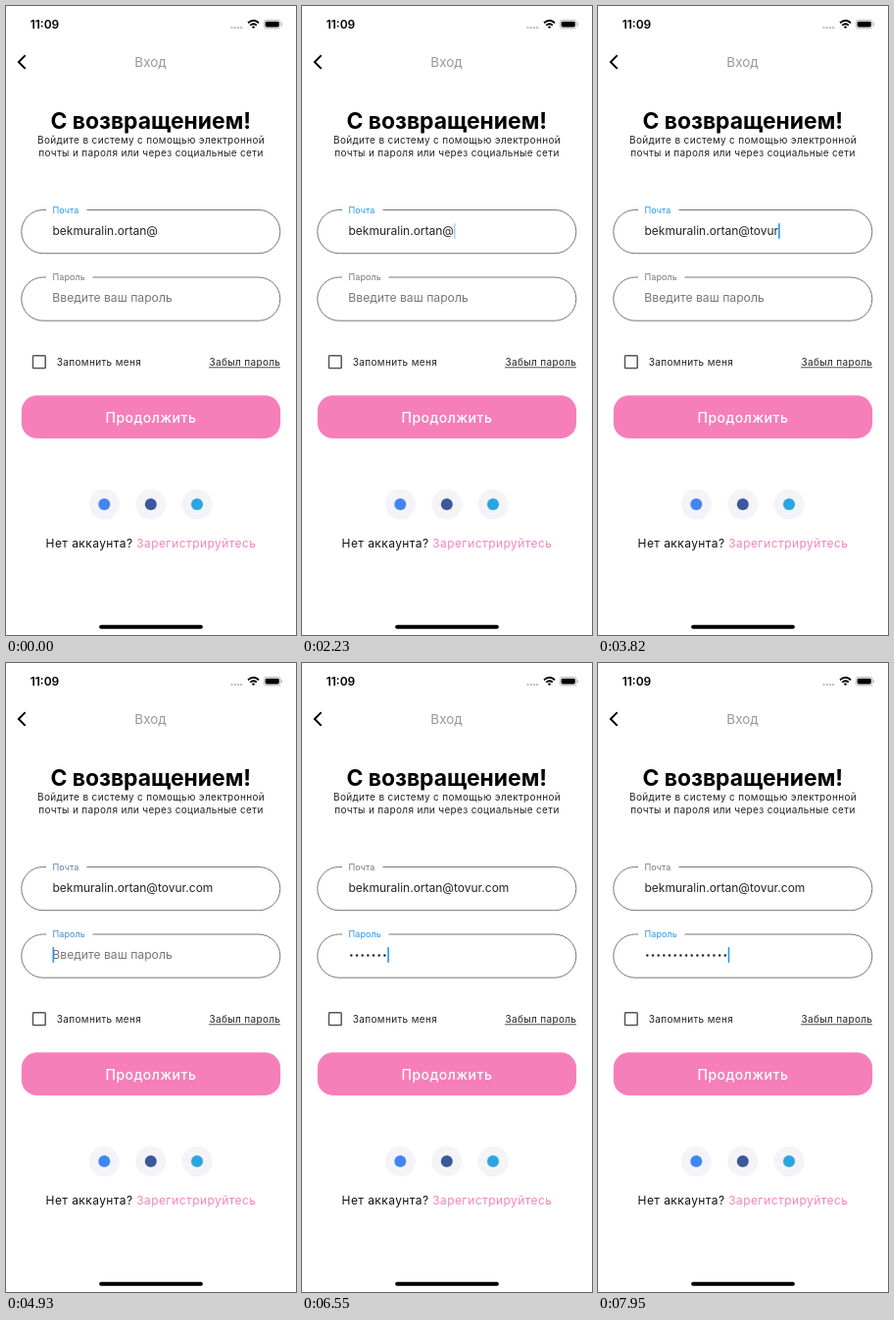
Animation, 296 px wide and 640 px high, one loop 8000 ms. Source, as an HTML page:

```html
<!DOCTYPE html>
<html lang="ru">
<head>
<meta charset="utf-8">
<title>Вход</title>
<style>
  html, body { margin: 0; width: 100%; height: 100%; overflow: hidden; background: #fff; }
  svg { display: block; width: 100%; height: 100%; font-family: Inter, "Open Sans", sans-serif; }
  .mid { text-anchor: middle; }
  .end { text-anchor: end; }
  .small { font-size: 10px; letter-spacing: .35px; fill: #222; }
  .label { font-size: 9px; letter-spacing: .1px; }
  .input { font-size: 12px; fill: #222; }
  .hint { font-size: 12.2px; fill: #777; }
  .footer { font-size: 12px; letter-spacing: .42px; }
  .frame { fill: none; stroke: #777; }
</style>
</head>
<body>
<svg viewBox="0 0 296 640">
  <!-- status bar -->
  <text x="24.7" y="23" font-size="12" font-weight="600">11:09</text>
  <path d="M229.5 22H241.5" stroke="#bbb" stroke-width="2" stroke-dasharray="2 1.2"/>
  <g fill="none" stroke="#000" stroke-width="1.8">
    <path d="M247 17.2Q252.5 12.4 258 17.2"/>
    <path d="M249.2 19.6Q252.5 16.8 255.8 19.6"/>
  </g>
  <path d="M250.8 21.2Q252.5 19.8 254.2 21.2L252.5 23Z"/>
  <rect x="263.3" y="14.4" width="16.8" height="8.4" rx="2.4" fill="none" stroke="#aaa" stroke-width=".8"/>
  <rect x="264.6" y="15.7" width="14.2" height="5.8" rx="1.4"/>
  <path d="M281.3 17.2V20" stroke="#aaa"/>

  <!-- heading -->
  <path d="M19.7 50.2L12.9 57L19.7 63.8" fill="none" stroke="#000" stroke-width="1.9"/>
  <text class="mid" x="147.5" y="62" font-size="13.5" fill="#999">Вход</text>
  <text class="mid" x="147.7" y="125" font-size="22.9" font-weight="700">С возвращением!</text>
  <g class="small mid">
    <text x="148" y="140">Войдите в систему с помощью электронной</text>
    <text x="148" y="153">почты и пароля или через социальные сети</text>
  </g>

  <!-- fields -->
  <rect class="frame" x="15.8" y="207.5" width="264" height="44.2" rx="22"/>
  <rect class="frame" x="15.8" y="276" width="264" height="44.2" rx="22"/>
  <path d="M41 207.5H82.5M41 276H88.5" stroke="#fff" stroke-width="3"/>
  <text class="label" id="mailLabel" x="47.5" y="210.5">Почта</text>
  <text class="label" id="passLabel" x="47.5" y="279">Пароль</text>
  <text class="input" id="mail" x="47.5" y="233"></text>
  <text class="hint" id="hint" x="47.3" y="301.3">Введите ваш пароль</text>
  <g id="dots" fill="#222"></g>
  <rect id="caret" width="1.6" height="16" rx=".8" fill="#2196f3"/>

  <!-- options and button -->
  <rect x="27.5" y="355.8" width="12.7" height="12.7" rx=".8" fill="none" stroke="#555" stroke-width="1.5"/>
  <text class="small" x="51.8" y="365.8">Запомнить меня</text>
  <text class="small end" x="280.3" y="365.8">Забыл пароль</text>
  <path d="M207 367.8H280" stroke="#222" stroke-width=".8"/>
  <rect x="15.8" y="396.3" width="264.3" height="43.7" rx="15.8" fill="#f67fba"/>
  <text class="mid" x="148" y="423.5" font-size="14" font-weight="500" letter-spacing=".55" fill="#fff">Продолжить</text>

  <!-- sign-in options -->
  <g fill="#f4f4f8">
    <circle cx="100.3" cy="507" r="15.5"/><circle cx="147.8" cy="507" r="15.5"/><circle cx="195" cy="507" r="15.5"/>
  </g>
  <circle cx="100.3" cy="507" r="6" fill="#4285f4"/>
  <circle cx="147.8" cy="507" r="6" fill="#3b5998"/>
  <circle cx="195" cy="507" r="6" fill="#2aa5e0"/>
  <text class="footer" x="40.6" y="551" fill="#111">Нет аккаунта?</text>
  <text class="footer end" x="255.3" y="551" fill="#f584bd">Зарегистрируйтесь</text>
  <rect x="95.1" y="629.8" width="105.8" height="4" rx="2"/>
</svg>
<script>
  const LOOP = 8000, FOCUS = 4800, FIRST_DOT = 5470, DOT_STEP = 170, DOT_WIDTH = 5.68, TEXT_X = 47.5;
  const FIRST_BLINK = 170;
  const typedStart = "bekmuralin.ortan@", typedRest = "tovur.com";
  const keyTimes = [2440, 2760, 3100, 3420, 3740, 4000, 4160, 4380, 4600];

  const byId = id => document.getElementById(id);
  const mail = byId("mail"), hint = byId("hint"), dots = byId("dots"), caret = byId("caret");
  const clamp = v => Math.max(0, Math.min(1, v));
  const easeOut = v => 1 - (1 - clamp(v)) ** 2;

  const dotNodes = Array.from({ length: 15 }, (_, i) => {
    const dot = document.createElementNS("http://www.w3.org/2000/svg", "circle");
    dot.setAttribute("cx", TEXT_X + 2.8 + i * DOT_WIDTH);
    dot.setAttribute("cy", 297.5);
    dot.setAttribute("r", 1.2);
    return dots.appendChild(dot);
  });

  function labelColor(active) {
    const mix = (from, to) => Math.round(from + (to - from) * active);
    return `rgb(${mix(119, 33)},${mix(119, 150)},${mix(119, 243)})`;
  }

  // The caret stays solid after an edit, then fades out and in every half second.
  function caretOpacity(time, lastEdit) {
    const since = time - (lastEdit ?? FIRST_BLINK);
    if (lastEdit !== undefined && since < 500) return 1;
    const phase = (since + 1000) % 1000;
    const fade = easeOut((phase % 500) / 250);
    return phase < 500 ? fade : 1 - fade;
  }

  function draw(time) {
    const keys = keyTimes.filter(k => k <= time).length;
    const dotCount = Math.max(0, Math.min(15, Math.floor((time - FIRST_DOT) / DOT_STEP) + 1));
    const inPassword = time >= FOCUS;
    const lastEdit = dotCount ? FIRST_DOT + (dotCount - 1) * DOT_STEP
      : inPassword ? FOCUS : keyTimes[keys - 1];

    mail.textContent = typedStart + typedRest.slice(0, keys);
    hint.style.display = dotCount ? "none" : "";
    dotNodes.forEach((dot, i) => dot.style.display = i < dotCount ? "" : "none");

    const shift = clamp((time - FOCUS) / 200);
    byId("mailLabel").style.fill = labelColor(1 - shift);
    byId("passLabel").style.fill = labelColor(shift);

    const width = inPassword ? dotCount * DOT_WIDTH : mail.getComputedTextLength();
    caret.setAttribute("x", TEXT_X + width);
    caret.setAttribute("y", inPassword ? 289 : 221);
    caret.setAttribute("opacity", caretOpacity(time, lastEdit));
  }

  const start = performance.now();
  function tick() {
    draw((performance.now() - start) % LOOP);
    requestAnimationFrame(tick);
  }
  tick();
</script>
</body>
</html>
```
